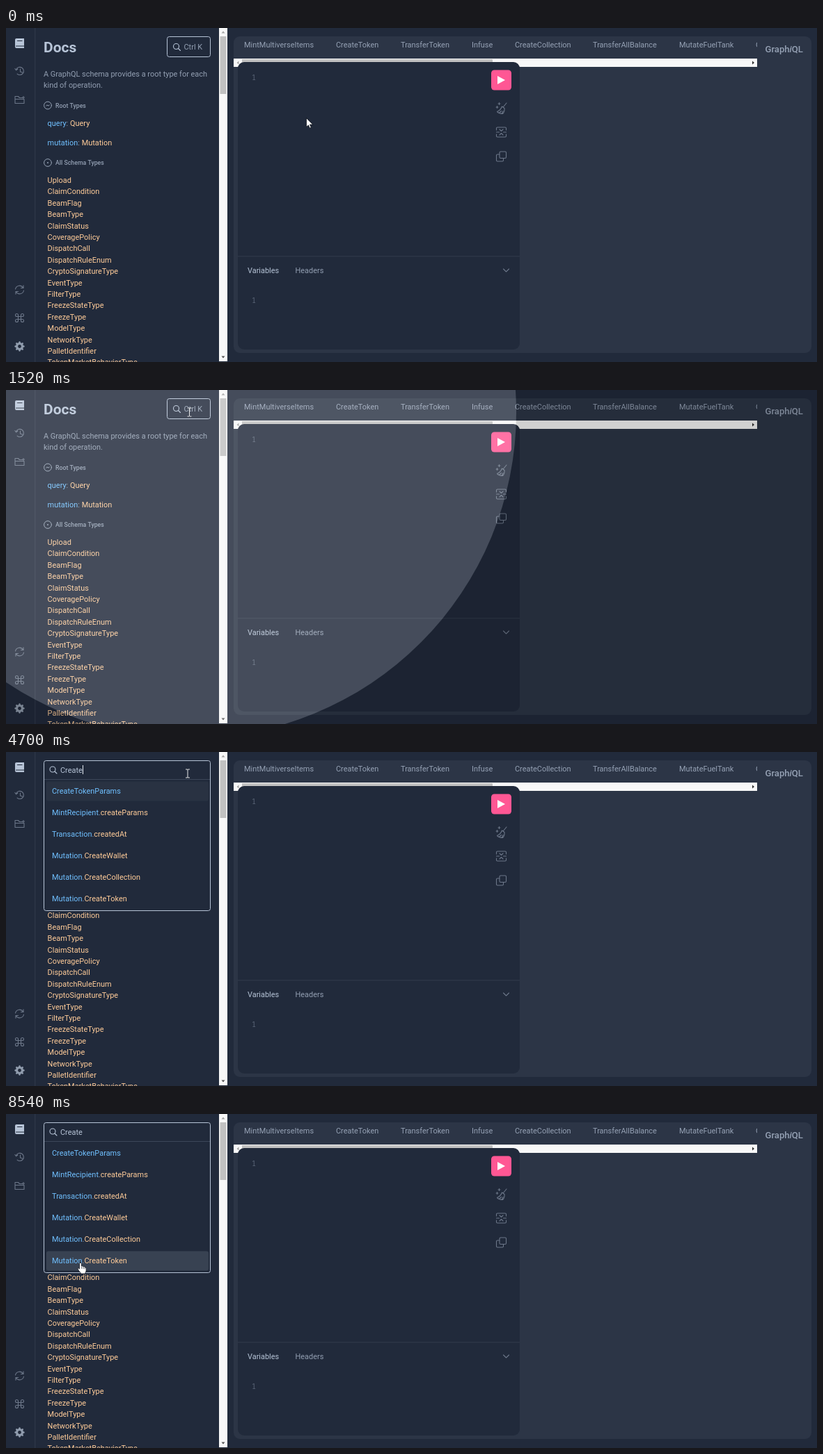
These frames come from a looping animation (1165x481 px, 8610 ms). An HTML page with a canvas:

```html
<!DOCTYPE html>
<html lang="en">
<head>
<meta charset="utf-8">
<title>GraphiQL docs search</title>
<style>
  html, body { margin: 0; width: 100%; height: 100%; overflow: hidden; background: #212a3b; }
  canvas { display: block; width: 1165px; height: 481px; }
</style>
</head>
<body>
<canvas id="stage"></canvas>
<script>
const W = 1165, H = 481, LOOP = 8610, STEP = LOOP / 130;
const BG = '#212a3b', PANEL = '#2c3546', NEUTRAL = '#b7c4d7';
const SOFT = 'rgba(183,196,215,.76)', FAINT = 'rgba(183,196,215,.4)', ICON = 'rgba(183,196,215,.5)';
const BLUE = '#70c0ff', ORANGE = '#ffcc99', PINK = '#ff5794';
const SANS = 'Roboto, sans-serif', BODY = '10.95px ' + SANS;

const canvas = document.getElementById('stage');
const dpr = window.devicePixelRatio || 1;
canvas.width = W * dpr;
canvas.height = H * dpr;
const ctx = canvas.getContext('2d');

const types = ['Upload', 'ClaimCondition', 'BeamFlag', 'BeamType', 'ClaimStatus', 'CoveragePolicy',
  'DispatchCall', 'DispatchRuleEnum', 'CryptoSignatureType', 'EventType', 'FilterType', 'FreezeStateType',
  'FreezeType', 'ModelType', 'NetworkType', 'PalletIdentifier', 'TokenMarketBehaviorType'];
const tabs = [[342, 'MintMultiverseItems'], [474, 'CreateToken'], [567, 'TransferToken'], [669, 'Infuse'],
  [731, 'CreateCollection'], [843, 'TransferAllBalance'], [967, 'MutateFuelTank'], [1077, 'CreateWallet']];

// Search results: start time, total hits, visible entries
const results = [
  [3370, 100, types.slice(0, 10)],
  [3570, 100, ['ClaimCondition', 'ClaimStatus', 'CoveragePolicy', 'DispatchCall', 'DispatchRuleEnum',
    'CryptoSignatureType', 'Collection', 'TransactionState', 'AccountInput', 'CreateTokenParams']],
  [4290, 10, ['CryptoSignatureType', 'CreateTokenParams', 'MintRecipient.createParams', 'Transaction.createdAt',
    'Mutation.CreateWallet', 'Mutation.CreateCollection', 'Mutation.CreateToken', 'Mutation.CreateBeam',
    'Mutation.CreateListing', 'Mutation.DecreaseStake']],
  [4700, 6, ['CreateTokenParams', 'MintRecipient.createParams', 'Transaction.createdAt',
    'Mutation.CreateWallet', 'Mutation.CreateCollection', 'Mutation.CreateToken']]
];
const keyTimes = [3370, 3770, 3900, 4030, 4290, 4500];

// Pointer path: time, x, y
const path = [[0, 431.5, 130], [530, 431.5, 130], [1390, 263.5, 32], [2384, 263.5, 32], [2450, 261, 31],
  [5164, 261, 31], [5600, 165, 71], [6090, 107, 125], [6156, 105, 131], [6954, 104, 182], [7880, 108, 222],
  [8080, 108, 222], [8540, 107, 214], [LOOP, 107, 214]];

const clamp = v => Math.max(0, Math.min(1, v));
const mix = (a, b, p) => a + (b - a) * p;

function ease(x) {
  x = clamp(x);
  const curve = (s, a, b) => 3 * (1 - s) ** 2 * s * a + 3 * (1 - s) * s * s * b + s ** 3;
  let lo = 0, hi = 1;
  for (let i = 0; i < 20; i++) {
    const m = (lo + hi) / 2;
    if (curve(m, .41, 0) < x) lo = m; else hi = m;
  }
  return curve(lo, .52, .94);
}

function pointerAt(t) {
  let i = 1;
  while (i < path.length - 1 && path[i][0] <= t) i++;
  const a = path[i - 1], b = path[i];
  let p = clamp((t - a[0]) / (b[0] - a[0]));
  if (i === 2) p = p * p * (3 - 2 * p);
  return { x: mix(a[1], b[1], p), y: mix(a[2], b[2], p) };
}

function text(str, x, y, color, font = BODY) {
  ctx.font = font;
  ctx.fillStyle = color;
  ctx.fillText(str, x, y);
  return x + ctx.measureText(str).width;
}

function rect(x, y, w, h, color, r = 0) {
  ctx.fillStyle = color;
  ctx.beginPath();
  ctx.roundRect(x, y, w, h, r);
  ctx.fill();
}

function frame(x, y, w, h, r) {
  ctx.strokeStyle = NEUTRAL;
  ctx.lineWidth = 1;
  ctx.beginPath();
  ctx.roundRect(x + .5, y + .5, w - 1, h - 1, r);
  ctx.stroke();
}

function shape(x, y, d, stroke, width = 1.1, fill) {
  const p = new Path2D(d);
  ctx.save();
  ctx.translate(x, y);
  ctx.lineJoin = ctx.lineCap = 'round';
  if (fill) { ctx.fillStyle = fill; ctx.fill(p); }
  if (stroke) { ctx.strokeStyle = stroke; ctx.lineWidth = width; ctx.stroke(p); }
  ctx.restore();
}

function disc(x, y, r, color) {
  ctx.fillStyle = color;
  ctx.beginPath();
  ctx.arc(x, y, r, 0, Math.PI * 2);
  ctx.fill();
}

function magnifier(x, y) {
  shape(x, y, 'M3 -1A4 4 0 1 1 -5 -1A4 4 0 1 1 3 -1M2 2L5 5', NEUTRAL, 1.1);
}

function drawSidebar() {
  rect(41, 0, 1.5, H, PANEL);
  shape(19.5, 22, 'M-4.5 -7H6.5V7H-4.5A2 2 0 0 1 -6.5 5V-5A2 2 0 0 1 -4.5 -7Z', null, 1, NEUTRAL);
  shape(19.5, 22, 'M-3 -3.5H3.5M-5 4H6.5', BG, 1.2);
  shape(19.5, 62, 'M-4.6 -2.8A5.6 5.6 0 1 1 -3.4 4.2M-6.6 -3.5L-5 -1.2L-2.6 -3M1 -3V1L4 2', ICON);
  shape(19.5, 103.5, 'M-6.5 5V-5H-2L0 -3H4M-6.5 5H6.5V-1H-6.5M5.5 -5V-2M4 -3.5H7', ICON);
  shape(19.5, 377, 'M-6 -1A6 6 0 0 1 5 -3M5.5 -6.2V-2.5H2M6 1A6 6 0 0 1 -5 3M-5.5 6.2V2.5H-2', ICON);
  shape(19.5, 417.5, 'M-2 -2H2V2H-2ZM-2 -2H-4A2 2 0 1 1 -2 -4ZM2 -2V-4A2 2 0 1 1 4 -2Z' +
    'M2 2H4A2 2 0 1 1 2 4ZM-2 2V4A2 2 0 1 1 -4 2Z', ICON);
  ctx.fillStyle = '#909cad';
  ctx.beginPath();
  for (let i = 0; i < 32; i++) {
    const a = (i - .5) * Math.PI / 16, r = i % 4 < 2 ? 7.2 : 5.5;
    ctx.lineTo(19.5 + r * Math.cos(a), 458.5 + r * Math.sin(a));
  }
  ctx.fill();
  disc(19.5, 458.5, 2.4, BG);
}

function drawDocs(open) {
  if (!open) {
    text('Docs', 54, 35, NEUTRAL, '700 21px ' + SANS);
    frame(231, 12, 63, 30, 3);
    magnifier(245.5, 27.5);
    text('Ctrl K', 255.5, 31, SOFT);
  }
  text('A GraphQL schema provides a root type for each', 54, 70, SOFT);
  text('kind of operation.', 54, 86, SOFT);
  const heading = '500 8.76px ' + SANS;
  const ring = 'M5.4 0A5.4 5.4 0 1 1 -5.4 0A5.4 5.4 0 1 1 5.4 0';
  shape(60, 111.5, ring + 'M-2.4 .5Q-1.2 -1.2 0 0T2.4 -.5', SOFT, 1);
  text('Root Types', 71, 114.7, SOFT, heading);
  shape(60, 194, ring, SOFT, 1);
  disc(60, 194, 1, SOFT);
  text('All Schema Types', 71, 197.2, SOFT, heading);
  [['query', 'Query', 141], ['mutation', 'Mutation', 168.5]].forEach(([key, type, y]) => {
    const x = text(': ', text(key, 59.6, y, BLUE), y, SOFT);
    text(type, x, y, ORANGE);
  });
  types.forEach((name, i) => text(name, 59.6, 223 + i * 16.4, ORANGE));
}

function drawScrollbars() {
  rect(306, 0, 12, 480, '#f8f8f8');
  rect(307.5, 12, 9, 83, '#c1c1c1');
  shape(312, 6, 'M-2.5 1.5L0 -1.5L2.5 1.5Z', null, 1, '#a3a3a3');
  shape(312, 474, 'M-2.5 -1.5L0 1.5L2.5 -1.5Z', null, 1, '#505050');
  rect(327, 44, 752, 12, '#f8f8f8');
  rect(339, 45, 360, 10, '#c1c1c1');
  shape(333, 50, 'M1.5 -2.5L-1.5 0L1.5 2.5Z', null, 1, '#a3a3a3');
  shape(1073.5, 50, 'M-1.5 -2.5L1.5 0L-1.5 2.5Z', null, 1, '#303030');
}

function drawEditor() {
  rect(327, 12, 830, 456, PANEL, 9);
  ctx.save();
  ctx.beginPath();
  ctx.rect(327, 12, 752, 32);
  ctx.clip();
  tabs.forEach(([x, name]) => text(name, x, 27.7, SOFT));
  ctx.restore();
  const logo = '500 13.1px ' + SANS;
  let x = text('Graph', 1090.5, 34.5, SOFT, logo);
  x = text('i', x, 34.5, SOFT, 'italic ' + logo);
  text('QL', x, 34.5, SOFT, logo);
  drawScrollbars();

  rect(333, 49, 405, 414, BG, 9);
  rect(333, 328, 405, 1.5, PANEL);
  const mono = '10px "Noto Sans Mono", monospace';
  text('1', 353, 75, FAINT, mono);
  text('1', 353, 396, FAINT, mono);
  text('Variables', 347, 353, NEUTRAL);
  text('Headers', 415.5, 353, SOFT);
  shape(718.5, 349, 'M-4 -2L0 2L4 -2', ICON, 1.1);

  rect(697, 60.5, 29, 29, PINK, 4.5);
  shape(711, 75, 'M-5 -6L6 0L-5 6Z', null, 1, '#fff');
  shape(711.5, 115.5, 'M7.5 -7.5L3 -2M1 -2.5L4.5 0Q5 5 2 8Q-3 8 -6 5Q-1 3 1 -2.5M-2.5 6.5L0 4M1 7.5L2.5 4' +
    'M-3 -8V-5M-4.5 -6.5H-1.5M-6 -3V0M-7.5 -1.5H-4.5', ICON);
  shape(711.5, 150, 'M-7 -3V-5.5Q-7 -7 -5.5 -7H5.5Q7 -7 7 -5.5V-3M-7 3V5.5Q-7 7 -5.5 7H5.5Q7 7 7 5.5V3' +
    'M-7 0H-3M3 0H7M-2.5 -4L0 -1.5L2.5 -4M-2.5 4L0 1.5L2.5 4', ICON);
  shape(711.5, 185, 'M-1 -7H5.5Q7 -7 7 -5.5V1Q7 2.5 5.5 2.5H-1Q-2.5 2.5 -2.5 1V-5.5Q-2.5 -7 -1 -7Z' +
    'M-2.5 -3H-5.5Q-7 -3 -7 -1.5V5.5Q-7 7 -5.5 7H1.5Q3 7 3 5.5V2.5', ICON);
}

function drawResults([, total, items], pointer) {
  const long = total > 9, bottom = long ? 331 : 229;
  const right = long ? 279 : 291;
  ctx.save();
  ctx.beginPath();
  ctx.rect(54, 40, 240, bottom - 41);
  ctx.clip();
  const hover = pointer.y >= 41;
  const active = hover ? Math.min(5, Math.floor((pointer.y - 41) / 31)) : 0;
  rect(58, 42.5 + active * 31, right - 58, 28, hover ? '#384252' : '#293242', 3);
  items.forEach((name, i) => {
    const [type, field] = name.split('.'), y = 60 + i * 31;
    const x = text(type, 66, y, BLUE);
    if (field) text(field, text('.', x, y, SOFT), y, ORANGE);
  });
  if (long) {
    rect(281, 40, 12, 291, '#f8f8f8');
    rect(282.5, 52, 9, Math.max(18, 267 * 292 / (total * 31 + 8)), '#c1c1c1');
    shape(287, 46, 'M-2.5 1.5L0 -1.5L2.5 1.5Z', null, 1, '#a3a3a3');
    shape(287, 325, 'M-2.5 -1.5L0 1.5L2.5 -1.5Z', null, 1, '#505050');
  }
  ctx.restore();
}

function drawSearch(t, pointer) {
  const list = results.filter(r => t >= r[0] - 8).pop();
  const typed = 'Create'.slice(0, keyTimes.filter(k => t >= k - 8).length);
  const height = !list ? 28 : (list[1] > 9 ? 331 : 229) - 12;
  rect(54, 12, 240, height, BG, 3);
  if (list) {
    rect(55, 39, 238, 1, '#3c475a');
    drawResults(list, pointer);
  }
  frame(54, 12, 240, height, 3);
  magnifier(68, 26);
  const end = typed ? text(typed, 78, 29.5, NEUTRAL) : 78;
  if (!typed) text('Ctrl K', 78.5, 29.5, SOFT);
  const last = keyTimes.filter(k => t >= k - 8).pop() || 2440;
  if (Math.floor((t - last + 8) / 530) % 2 === 0) rect(Math.round(end), 19, 1, 13, '#e4eaf2');
}

function drawSpotlight(t, { x, y }) {
  if (t <= 0) return;
  const spread = t < 1391 ? 1 - ease((t - 10) / 310) : ease((t - 1391) / 470);
  const alpha = .5 * (1 - spread);
  if (alpha < .002) return;
  const r = mix(73, 657, spread);
  ctx.fillStyle = `rgba(0,0,0,${alpha})`;
  ctx.beginPath();
  ctx.rect(0, 0, W, H);
  ctx.arc(x, y, r, 0, Math.PI * 2);
  ctx.fill('evenodd');
  disc(x, y, r, `rgba(255,255,255,${alpha})`);
}

function drawPointer({ x, y }, open) {
  if (open && y >= 41) {
    shape(x, y, 'M0 0Q1.5 0 1.5 1.5V5Q3.6 4.5 4 5.8Q6 5.2 6.4 6.7Q8.2 6.4 8.2 8.4V11Q8.2 13 7 14.5V16H.2V14.7' +
      'Q-2.6 12 -4 9Q-4 7 -2.4 8L-1.5 9.2V1.5Q-1.5 0 0 0Z', '#10141c', .8, '#fff');
    shape(x, y, 'M1.6 6V8.5M4 6.5V8.8M6.2 7.2V9', '#10141c', .6);
  } else if (x < 294 && y < 42) {
    shape(x, y, 'M-2.5 -6H-.8L0 -5.4L.8 -6H2.5M0 -5.4V5.4M-2.5 6H-.8L0 5.4L.8 6H2.5', '#e8e8e8', 1);
  } else {
    shape(x, y, 'M0 0V12.6L2.9 9.9L4.8 14.2L6.9 13.3L5 9.1H9Z', '#10141c', .8, '#fff');
  }
}

function draw(now) {
  const t = Math.floor((now % LOOP + 8) / STEP) % 130 * STEP;
  const open = t > 2445, pointer = pointerAt(t);
  ctx.setTransform(dpr, 0, 0, dpr, 0, 0);
  rect(0, 0, W, H, BG);
  drawSidebar();
  drawDocs(open);
  drawEditor();
  if (open) drawSearch(t, pointer);
  drawSpotlight(t, pointer);
  if (open && t < 2778) disc(259.5, 31, 8.5, `rgba(255,245,0,${.52 * (1 - (t - 2450) / 330)})`);
  drawPointer(pointer, open);
  requestAnimationFrame(draw);
}
requestAnimationFrame(draw);
</script>
</body>
</html>
```
